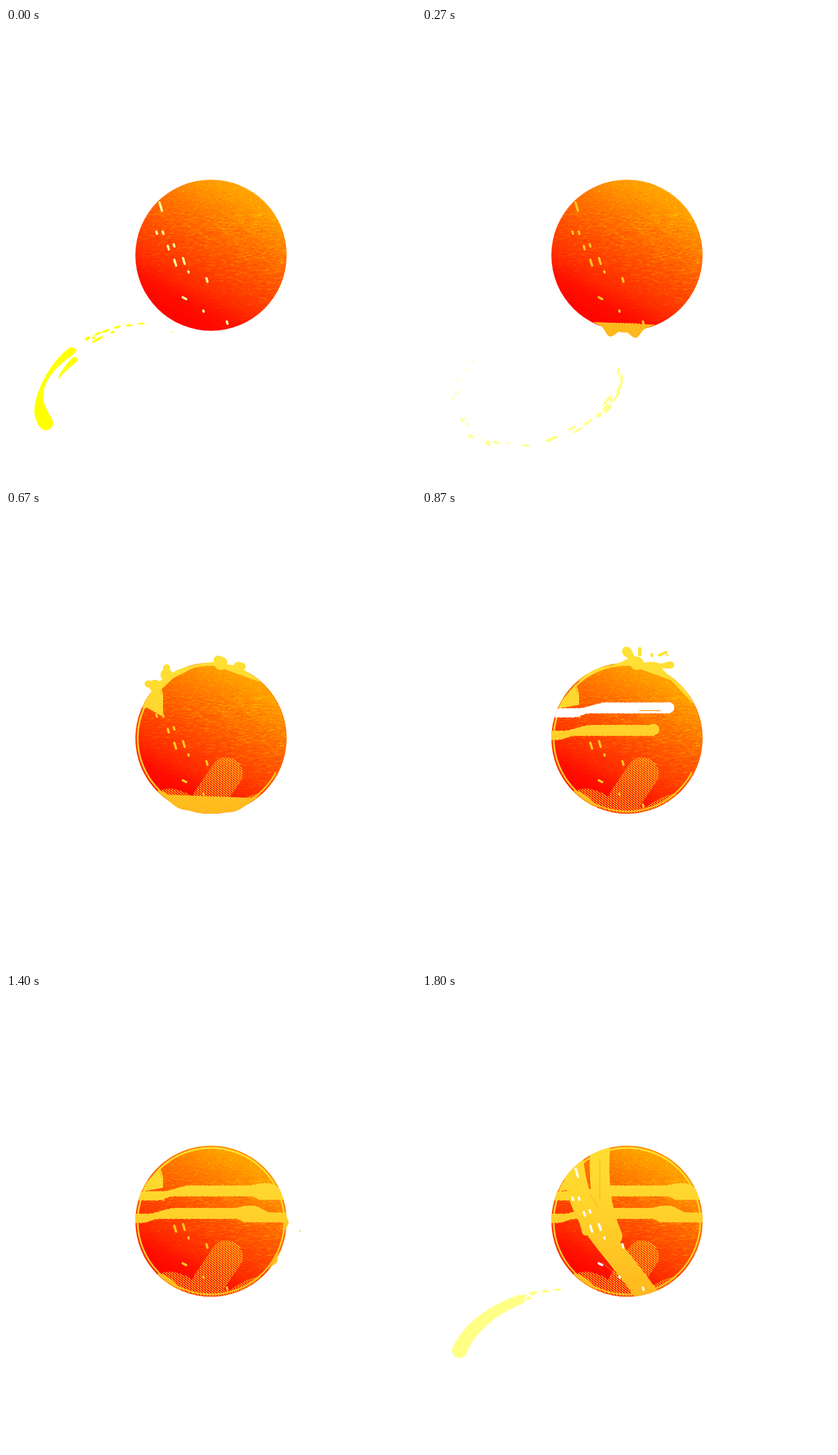
An HTML page with a canvas that plays this animation: 710x789 px, repeating every 1870 ms.

```html
<!DOCTYPE html>
<html>
<head>
<meta charset="utf-8">
<style>
html, body { margin: 0; width: 100%; height: 100%; overflow: hidden; background: #fff; }
canvas { display: block; }
</style>
</head>
<body>
<canvas id="stage" width="710" height="789"></canvas>
<script>
const LOOP = 1870, STEPS = 28, CX = 355, CY = 394, R = 131, DEG = Math.PI / 180;
const g = document.getElementById('stage').getContext('2d');

let seed = 7;
const rnd = () => (seed = seed * 16807 % 2147483647) / 2147483647;
const clamp = v => Math.max(0, Math.min(1, v));
const smooth = v => (v = clamp(v)) * v * (3 - 2 * v);
const mix = (a, b, u) => a + (b - a) * u;
// Rises from a to b, falls from b to c
const ramp = (k, a, b, c) => clamp(Math.min((k - a) / (b - a), (c - k) / (c - b)));

function layer(w, h, paint) {
  const c = document.createElement('canvas');
  c.width = w; c.height = h;
  paint(c.getContext('2d'));
  return c;
}

function gradient(x0, y0, x1, y1, stops) {
  const fill = g.createLinearGradient(x0, y0, x1, y1);
  stops.forEach(([at, color]) => fill.addColorStop(at, color));
  return fill;
}

const gold = gradient(0, 240, 0, 530, [[0, '#ffe236'], [.4, '#ffd52c'], [1, '#ffb81c']]);

const ball = layer(710, 789, b => {
  b.arc(CX, CY, R, 0, 7);
  b.clip();
  b.fillStyle = gradient(430, 262, 300, 505, [[0, '#ffa800'], [.15, '#ff9a00'], [.32, '#ff7800'],
    [.55, '#ff5000'], [.74, '#ff3000'], [.88, '#ff0e00'], [1, '#ff0000']]);
  b.fillRect(0, 0, 710, 789);
  for (let i = 0; i < 6500; i++) {
    const x = CX - R + rnd() * 2 * R | 0, y = CY - R + rnd() * 2 * R | 0;
    const warm = (CY + R - y + (x - CX) * .5) / (2 * R);
    b.fillStyle = rnd() < warm ? `rgba(255,200,0,${warm * .45})` : 'rgba(245,40,0,.22)';
    b.fillRect(x, y, 1 + rnd() * (y < 320 ? 2 : 8), 1);
  }
});

const dots = g.createPattern(layer(5, 4, d => {
  d.fillStyle = '#ffc41e';
  for (let y = 0; y < 4; y++) for (let x = 0; x < 5; x++) if ((x + 4 * y) % 5 < 2) d.fillRect(x, y, 1, 1);
}), 'repeat');

function oval(x, y, rx, ry, turn, color) {
  g.fillStyle = color;
  g.beginPath();
  g.ellipse(x, y, rx, ry, turn, 0, 7);
  g.fill();
}

function line(color, width, path) {
  g.strokeStyle = color;
  g.lineWidth = width;
  g.lineCap = 'round';
  g.stroke(new Path2D(path));
}

function clipped(x, y, w, h, draw) {
  g.save();
  g.beginPath();
  g.rect(x, y, w, h);
  g.clip();
  draw();
  g.restore();
}

// Liquid standing out of the rim: each lobe is [angle in degrees, height, width]
function film(amount, ...lobes) {
  if (amount <= 0) return;
  g.fillStyle = gold;
  for (const [angle, height, width] of lobes) {
    g.beginPath();
    for (let d = -2.5; d <= 2.5; d += .1) {
      const a = (angle + d * width) * DEG, r = R - 1 + amount * height * Math.exp(-d * d);
      g.lineTo(CX + r * Math.cos(a), CY + r * Math.sin(a));
    }
    g.fill();
  }
}

// Thrown arm with a thick root, a thin neck and a round tip
function arm(amount, x0, y0, x1, y1, root, tip) {
  if (amount <= 0) return;
  for (let u = 0; u <= 1; u += .03) {
    const r = root * (1 - u) ** 3 + 2.5 + (tip - 2.5) * smooth(u * 1.6 - .5);
    oval(mix(x0, x1, u * amount), mix(y0, y1, u * amount), r, r, 0, gold);
  }
}

// Tilted ellipse on which the liquid flies round
function orbit(p, scale = 1) {
  const u = 150 * scale * Math.cos(p * DEG), v = -96 * scale * Math.sin(p * DEG);
  const c = Math.cos(20 * DEG), s = Math.sin(20 * DEG);
  return [203 + u * c + v * s, 620 - u * s + v * c];
}

const scraps = Array.from({ length: 60 }, () => ({
  p: 35 + rnd() * 310, scale: .94 + rnd() * .11, len: 4 + rnd() * 9, width: 1.5 + rnd() * 3, life: 3 + rnd() * 4
}));

function comet(k) {
  const head = 190 + 40 * k, flying = k < 4;
  const tail = Math.max(40, head - (k < 0 ? 60 : 75));
  const color = k < 0 || k > 3 ? '#ffff86' : '#ffff00';
  for (const { p, scale, len, width, life } of scraps) {
    const left = 1 - (head - p) / 40 / life;
    if (left <= 0 || flying && p > tail || k < 0 && p < 58) continue;
    const [x, y] = orbit(p, scale), [nx, ny] = orbit(p + 1, scale);
    oval(x, y, len * Math.sqrt(left), width * left + .4, Math.atan2(ny - y, nx - x), color);
  }
  if (!flying) return;
  for (let u = 0; u <= 1; u += .01) {
    const neck = 2.5 + 4 * Math.exp(-((u / .25) ** 2)) + 10 * Math.exp(-(((u - .95) / .3) ** 2));
    const r = k < 0 ? 8 + 5 * u : neck;
    oval(...orbit(mix(tail, head, u)), r, r, 0, color);
    if (k >= 0) oval(...orbit(mix(head - 70, head - 48, u), .85), 5 - 4 * u, 5 - 4 * u, 0, color);
  }
}

// Bright flecks: x, y, half length
const flecks = [[268, 310, 7], [272, 355, 2], [261, 355, 2], [281, 381, 3], [291, 377, 2], [293, 407, 5],
  [308, 404, 5], [316, 423, 1], [348, 437, 3], [342, 491, 1], [383, 511, 2]];
function drawFlecks(color) {
  for (const [x, y, h] of flecks) line(color, 4, `M${x - h * .3} ${y - h}L${x + h * .3} ${y + h}`);
  line(color, 4, 'M306 467l6 3');
}

// Wavy band across the ball, drawn up to x = end
function band(dx, dy, end, color) {
  g.fillStyle = color;
  g.beginPath();
  const edge = (x, y) => g.lineTo(Math.min(x + dx, end), y + dy);
  for (let x = 220; x <= 520; x += 4) {
    edge(x, 342 - 10 * smooth((x - 270) / 50) - 4 * smooth((x - 420) / 25) + 12 * smooth((x - 455) / 30) + Math.sin(x * .7) * .6);
  }
  for (let x = 520; x >= 220; x -= 4) {
    edge(x, 358 - 7 * smooth((x - 262) / 28) + 6 * smooth((x - 425) / 15) + Math.sin(x * .9) * .6);
  }
  g.fill();
}

function bands(k) {
  if (k < 11) return;
  const head = k < 14 ? 437 - (13 - k) * 95 : 540, white = k < 15;
  band(-26, 39, head - 35, gold);
  band(0, 0, head - 9, white ? '#fff' : gold);
  if (k < 14) {
    oval(head - 36, 379, 10, 10, 0, gold);
    oval(head - 10, 341, 10, 9.5, 0, '#fff');
    line('#ff9a10', 1.5, `M${head - 60} 346h36`);
  } else if (!white && k < 19) {
    for (let x = 240; x < 420; x += 16) oval(x, x < 300 ? 347 : 343, 2, 1.5, 0, '#fff');
    line('#fff', 5, `M${mix(330, 434, clamp((k - 15) / 2))} 348L465 349`);
    line('#fff', 3, 'M460 337l10 5');
  }
}

function strokes(k) {
  if (k < 25) return;
  clipped(220, 260, 270, 90 * (k - 24), () => {
    g.lineCap = 'butt';
    line(gold, 34, 'M309 255C305 320 308 370 330 420');
    line(gold, 38, 'M260 285C273 400 310 410 392 525');
    line(gold, 14, 'M272 365L284 412');
    line('#ff9c10', .8, 'M308 285v70M290 345l14 25M312 465l54 50');
    drawFlecks('#fff');
  });
}

// Free drops: x, y, speed x, speed y, first step, size
const drops = [[355, 241, -5, -11, 13, 4], [425, 250, 12.5, -1, 13, 2], [488, 424, 12, 1.5, 15, 6],
  [488, 445, 7, 5, 15, 4], [488, 408, 7, 1, 18, 2], [330, 551, -25, 20, 6, 4], [388, 559, 23, 11, 6, 4]];
function drawDrops(k) {
  for (const [x, y, vx, vy, from, size] of drops) {
    const n = k - from, speed = Math.hypot(vx, vy);
    if (n < 0 || n > 4 || n > 60 / speed) continue;
    const r = size * (1 - n / 8);
    oval(x + vx * n, y + vy * n, r * (1 + speed / 24), r / (1 + speed / 24), Math.atan2(vy, vx), gold);
  }
}

function stains(k) {
  if (k > 3) clipped(220, 511, 270, 20, () => oval(CX - 10, 524, 55, 14, 0, dots));
  if (k > 4) {
    const rise = clamp((k - 4) / 3);
    line(dots, 56, `M350 502L${mix(350, 382, rise)} ${mix(502, 455, rise)}`);
  }
  if (k > 5) {
    oval(300, 515, 48, 29, .45, dots);
    oval(284, 510, 34, 13, .75, gold);
    oval(400, 524, 55, 16, -.6, dots);
    g.fillStyle = gold;
    g.fill(new Path2D(`M230 341L266 302L272 318V${k < 11 ? 357 : 336}L244 341Z`));
  }
}

function ring(k) {
  if (k < 9) return;
  const open = k < 15;
  g.lineWidth = 3;
  g.strokeStyle = gold;
  g.beginPath();
  g.arc(CX, CY, R - 4, open ? .5 : 0, open ? 5.3 : 7);
  g.stroke();
  g.lineWidth = 1;
  g.strokeStyle = '#ff6a08';
  g.setLineDash([3, 2]);
  g.beginPath();
  g.arc(CX, CY, R - 1, 0, 7);
  g.stroke();
  g.setLineDash([]);
}

function splashes(k) {
  // below, spreading sideways
  const u = clamp((k - 4) / 3), spread = mix(9, 22, u), wide = mix(5, 8, u);
  const below = k < 4 ? 0 : clamp((11 - k) / 4);
  film(below, [93 + spread, 14, wide], [93 - spread, 14, wide], [93, 4, wide * 2]);
  // upper left
  const left = ramp(k, 5, 7, 11);
  film(left, [227, 11, 9], [243, 7, 8]);
  arm(left, 278, 284, 279, 234, 8, 6);
  arm(left, 258, 303, 210, 290, 8, 6);
  // crown on top
  const top = ramp(k, 9, 13, 17);
  film(top, [272, 8, 6], [290, 9, 9]);
  arm(top, 372, 264, 354, 243, 9, 8);
  arm(top, 402, 270, 431, 267, 6, 6);
  if (top > .7) {
    line(gold, 6, 'M377 239v10');
    line(gold, 5, 'M411 250l12 -5M398 249v2');
  }
  // right side, the lobes drifting apart while they sink
  const drift = clamp((k - 17) / 4), side = ramp(k, 13, 17, 25);
  film(ramp(k, 12, 17, 20), [244, 7, 6], [317, 6, 7]);
  film(side, [mix(11, 1, drift), mix(15, 9, drift), 3.5], [mix(24, 32, drift), mix(13, 9, drift), 3.5]);
}

function draw(k) {
  g.fillStyle = '#fff';
  g.fillRect(0, 0, 710, 789);
  comet(k > 24 ? k - STEPS : k);
  g.drawImage(ball, 0, 0);
  g.save();
  g.beginPath();
  g.arc(CX, CY, R, 0, 7);
  g.clip();
  stains(k);
  if (k < 25) drawFlecks(k < 1 ? '#ffff9c' : k < 3 ? '#ffe850' : '#ffc81e');
  ring(k);
  bands(k);
  strokes(k);
  g.restore();
  splashes(k);
  drawDrops(k);
}

function tick(now) {
  draw(Math.min(STEPS - 1, Math.floor((now % LOOP + 6) * STEPS / LOOP)));
  requestAnimationFrame(tick);
}
requestAnimationFrame(tick);
</script>
</body>
</html>
```
